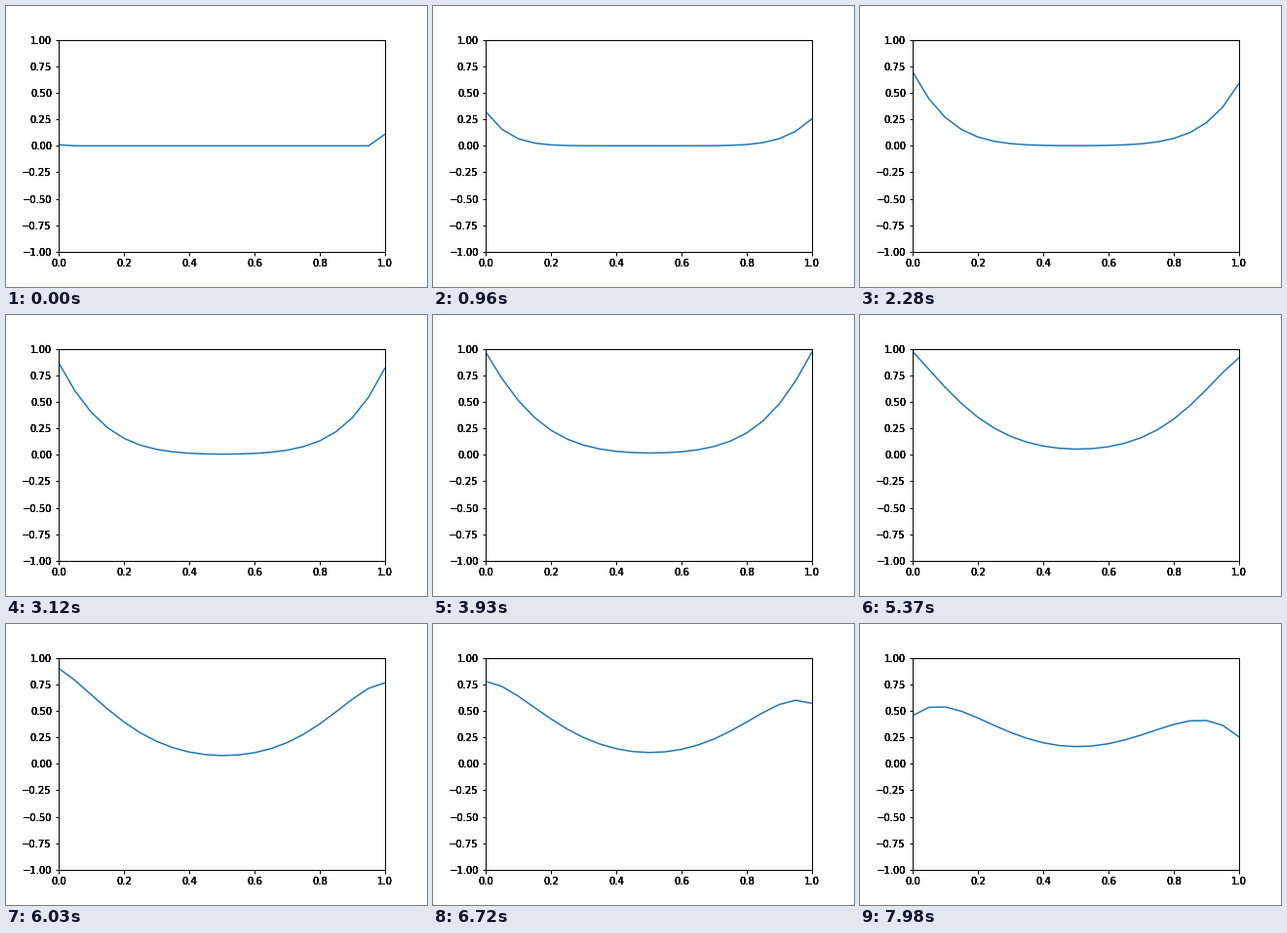
These frames come from a looping animation (432 px wide and 288 px high, 8 s). A matplotlib script:

```python
import numpy as np
import matplotlib.pyplot as plt
from matplotlib.animation import FuncAnimation

FRAMES = 267
LOOP_MS = 8000
DT = 0.01
DIFFUSIVITY = 0.02
LABEL_LAYERS = 5  # stacked labels give the heavy, hard-edged type

plt.rcParams.update({
    "font.family": "DejaVu Sans",
    "font.size": 10,
    "axes.linewidth": 1,
    "xtick.major.width": 1,
    "ytick.major.width": 1,
})

x = np.linspace(0, 1, 21)
dx = x[1] - x[0]


def solve_heat():
    """Explicit heat equation, driven at both ends of the rod."""
    r = DIFFUSIVITY * DT / dx**2
    u = np.zeros_like(x)
    rows = []
    for step in range(1, FRAMES + 1):
        t = step * DT
        if step > 1:
            u[1:-1] += r * (u[:-2] - 2 * u[1:-1] + u[2:])
        u[0] = np.sin(t)
        u[-1] = np.exp(-(t - 1.5) ** 2)
        rows.append(u.copy())
    return rows


def add_labels(ax, xticks, yticks):
    for _ in range(LABEL_LAYERS):
        for v in xticks:
            ax.annotate(f"{v:.1f}", (v, 0), xycoords=ax.get_xaxis_transform(),
                        xytext=(0, -7), textcoords="offset points",
                        ha="center", va="top")
        for v in yticks:
            ax.annotate(f"{v:.2f}".replace("-", "\u2212"), (0, v),
                        xycoords=ax.get_yaxis_transform(),
                        xytext=(-7, 0), textcoords="offset points",
                        ha="right", va="center_baseline")


fig, ax = plt.subplots(figsize=(6, 4), dpi=72)
fig.subplots_adjust(left=0.125, right=0.9, bottom=0.125, top=0.88)

xticks = np.linspace(0, 1, 6)
yticks = np.linspace(-1, 1, 9)
ax.set(xlim=(0, 1), ylim=(-1, 1), xticks=xticks, yticks=yticks)
ax.tick_params(labelbottom=False, labelleft=False)
add_labels(ax, xticks, yticks)

states = solve_heat()
line, = ax.plot(x, states[0], color="#1f77b4", linewidth=1.5)


def update(frame):
    line.set_ydata(states[frame])
    return line,


anim = FuncAnimation(fig, update, frames=FRAMES, interval=LOOP_MS / FRAMES,
                     repeat=True, repeat_delay=0)
plt.show()
```
